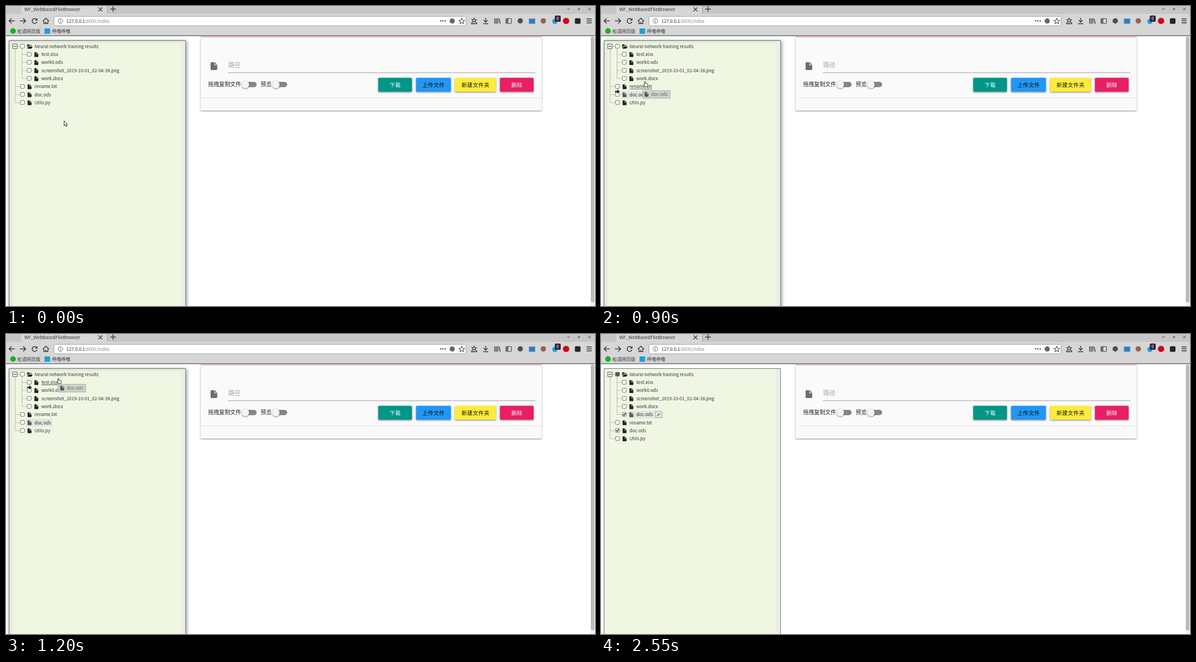
These frames come from a looping animation (1048x534 px, 2.9 s). An HTML page with a canvas:

```html
<!DOCTYPE html>
<html lang="zh">
<head>
<meta charset="utf-8">
<style>
  html, body { margin: 0; width: 100%; height: 100%; overflow: hidden; background: #fff; }
  canvas { display: block; }
</style>
</head>
<body>
<canvas id="stage" width="1048" height="534"></canvas>
<script>
const ctx = document.getElementById('stage').getContext('2d');
const LOOP = 2900, STEP = 50, ROW = 14.3, TOP = 71.8;
const INK = '#3b3b3b';

function box(x, y, w, h, fill, stroke, r = 0) {
  ctx.beginPath();
  ctx.roundRect(x, y, w, h, r);
  if (fill) { ctx.fillStyle = fill; ctx.fill(); }
  if (stroke) { ctx.strokeStyle = stroke; ctx.lineWidth = 1; ctx.stroke(); }
}

function dot(x, y, r, fill) {
  ctx.beginPath();
  ctx.arc(x, y, r, 0, 7);
  ctx.fillStyle = fill;
  ctx.fill();
}

function shape(x, y, d, fill, stroke, width = 1) {
  const path = new Path2D(d);
  ctx.save();
  ctx.translate(x, y);
  if (fill) { ctx.fillStyle = fill; ctx.fill(path); }
  if (stroke) { ctx.strokeStyle = stroke; ctx.lineWidth = width; ctx.stroke(path); }
  ctx.restore();
}

const line = (d, color = INK, width = 1.4) => shape(0, 0, d, null, color, width);

function text(s, x, y, size = 7.95, color = '#333', spacing = 0) {
  ctx.font = `${size}px "Noto Sans CJK SC", "Noto Sans CJK", "Noto Sans", sans-serif`;
  ctx.letterSpacing = spacing + 'px';
  ctx.fillStyle = color;
  ctx.fillText(s, x, y);
  return ctx.measureText(s).width;
}

function shadowed(blur, dx, dy, alpha, draw) {
  ctx.save();
  ctx.shadowColor = `rgba(0,0,0,${alpha})`;
  ctx.shadowBlur = blur;
  ctx.shadowOffsetX = dx;
  ctx.shadowOffsetY = dy;
  draw();
  ctx.restore();
}

// ---- browser chrome ----
function browser() {
  box(0, 0, 1048, 14, '#c6c6c6');
  box(0, 14, 1048, 39, '#d6d6d6');
  box(27, 0, 153, 14, '#d6d6d6');
  line('M180.5 0V13.5', '#999', 1);
  text('WF_WebBasedFileBrowser', 32.8, 9, 8, '#333');
  line('M164.5 2.5l7 7m0-7l-7 7', INK, 1.2);
  line('M185.5 5.5h10M190.5 .5v10', INK, 1.4);
  line('M998.5 5.5h5M1017 5.5h5M1019.5 3v5M1035.5 3l5 5m0-5l-5 5', '#555', 1);

  line('M15.5 26.5H5.5M10 22L5.5 26.5L10 31M25 26.5H35M30.5 22L35 26.5L30.5 31', INK, 1.5);
  line('M54 23.6A4.3 4.3 0 1 0 55 28', INK, 1.5);
  shape(51.5, 21.5, 'M4.5 0V4.5H0Z', INK);
  line('M65.5 27L71 21.8L76.5 27M67.5 26.5V31.2H74.5V26.5M71 31V28', INK, 1.4);

  box(85.5, 18.5, 733, 16.5, '#fff', '#a6a6a6', 2);
  line('M101 26.7A4.2 4.2 0 1 1 92.6 26.7A4.2 4.2 0 1 1 101 26.7M96.8 26v3.2M96.8 24v1', '#666', 1);
  const w = text('127.0.0.1', 107.6, 29.7, 7.95, '#222');
  text(':8000/index', 107.6 + w, 29.7, 7.95, '#888');
  for (const x of [773.5, 777.5, 781.5]) dot(x, 26.5, 1.3, '#555');
  dot(794, 26.7, 4.6, '#666');
  const star = 'M0-5L1.5-1.6L5.1-1.3L2.4 1.1L3.2 4.6L0 2.7L-3.2 4.6L-2.4 1.1L-5.1-1.3L-1.5-1.6Z';
  shape(811, 26.8, star, null, '#555', 1.1);

  shape(833, 25.5, 'M0-4L1.2-1.3L4-1L2 1L2.6 3.5L0 2.2L-2.6 3.5L-2 1L-4-1L-1.2-1.3Z', null, INK, 1.2);
  line('M828.5 29v2.5h9V29M853.5 21v7.5M850 25.2l3.5 3.5l3.5-3.5M849 31.5h9', INK, 1.4);
  line('M869.5 22v9.5M872.3 22v9.5M875 22v9.5M877 22.2l2.5 9.3', INK, 1.4);
  box(889.5, 22.5, 10, 8.5, null, INK, 1);
  box(890, 23, 4, 8, '#777');
  dot(915, 26.5, 4.7, '#45544a');
  box(930.5, 22.5, 11, 9, '#2c7fc0');
  dot(956, 26.5, 4.8, '#93615a');
  dot(976.5, 27.5, 4.6, '#16a3df');
  box(976.5, 17, 10.5, 11, '#34203c', null, 1.5);
  text('0', 979.6, 25.3, 7.6, '#fff');
  dot(996.5, 26.5, 5.6, '#c90a15');
  box(1012.2, 21.7, 10, 10, '#262626', null, 2);
  line('M1033 23h9M1033 26.5h9M1033 30h9', INK, 1.4);

  dot(12.5, 44.5, 5, '#17b51e');
  text('松语网页版', 20.3, 48, 8.2);
  box(68.5, 40, 10, 9.5, '#1a9fd9');
  text('呼噜呼噜', 81.8, 48, 8.2);
  box(0, 52.3, 1048, 1.2, '#555');
}

// ---- right hand card ----
function toggle(x) {
  box(x, 135, 23, 9.4, '#858585', null, 4.7);
  shadowed(3, 0, 1, .45, () => dot(x + 3, 139.8, 6.6, '#f4f4f4'));
}

function button(label, x, w, fill, color) {
  shadowed(3, 0, 1.5, .4, () => box(x, 127.8, w, 24.7, fill, null, 1.5));
  ctx.textAlign = 'center';
  text(label, x + w / 2 + .2, 143.8, 9.6, color, .4);
  ctx.textAlign = 'left';
}

function card() {
  box(1040, 54, 8, 480, '#f1f1f1');
  box(1041.5, 55.5, 4.5, 471.5, '#bdbdbd', '#a5a5a5', 2);
  shadowed(3, 0, 1.3, .4, () => box(346.3, 55, 606.7, 131, '#fafafa', null, 1));
  box(346.3, 54, 606.7, 2, '#f3b6c2');
  box(346.3, 163, 606.7, 1, '#e6e6e6');
  shape(364, 100, 'M1.4 0H7.5L11.8 4.4V12.6Q11.8 14 10.4 14H1.4Q0 14 0 12.6V1.4Q0 0 1.4 0Z', '#6e6e6e');
  line('M371 101V105H375.2', '#fafafa', 1);
  text('路径', 395.3, 108.5, 11, '#a6a6a6');
  box(395, 118.2, 547, 1, '#9e9e9e');
  text('拖拽复制文件', 359.7, 142.6, 9.75, '#222');
  toggle(423);
  text('预览', 453, 142.6, 9.75, '#222');
  toggle(477.3);
  button('下载', 662.3, 60, '#009688', '#fff');
  button('上传文件', 729.6, 62, '#2196f3', '#111');
  button('新建文件夹', 798.8, 73, '#ffeb3b', '#111');
  button('删除', 878.8, 60, '#e91e63', '#fff');
}

// ---- file tree ----
const folder = { name: 'Neural network training results', level: 0, folder: true };
const children = ['test.xlsx', 'work0.ods', 'screenshot_2019-10-01_02-04-38.png', 'work.docx']
  .map(name => ({ name, level: 1 }));
const roots = ['rename.txt', 'doc.ods', 'Utils.py'].map(name => ({ name, level: 0 }));
const copy = { name: 'doc.ods', level: 1, checked: true };
const before = [folder, ...children, ...roots];
const after = [folder, ...children, copy, ...roots];
const DOC = 6;

function fileIcon(x, y, color = '#222') {
  shape(x, y, 'M.8 0H4L7 3V7.8Q7 8.6 6.2 8.6H.8Q0 8.6 0 7.8V.8Q0 0 .8 0Z', color);
  line(`M${x + 3.9} ${y + .3}V${y + 3.2}H${x + 6.8}`, '#eff6e2', .7);
}

function folderIcon(x, y, color) {
  shape(x, y, 'M0 6.5V1Q0 0 1 0H3.2L4.4 1.2H7.3Q8.2 1.2 8.2 2.6H3.3Q2.4 2.6 2 3.2ZM.4 7.8L2.7 3.7H10L7.8 7.2Q7.4 7.8 6.8 7.8Z', color);
}

function checkbox(x, y, state) {
  box(x, y, 7.4, 7, state === 'part' ? '#555' : '#f7f8f4', '#777', 1.5);
  if (state === true) shape(x, y, 'M1.4 3.4L3.2 5.3L6.4 1.2', null, '#222', 1.4);
}

function pencil(x, y) {
  box(x + .5, y - 5.5, 11, 11, '#e9ebe4', '#a5a8a0');
  shape(x, y, 'M3 3.2L3.5 1.2L7.2-2.8L9-1.1L5.2 2.7Z', '#888');
}

function tree(rows, s) {
  const draw = () => box(5.5, 61.5, 314, 490, '#eff6e2', '#617775');
  if (s.done) draw(); else shadowed(6, 1.5, 1, .4, draw);
  box(311.5, 62, 7.6, 472, '#ebeee6');
  const inner = s.drag && s.hover === 0;
  const rowY = i => TOP + ROW * i + (inner && i ? 1.1 : 0);
  const lastChild = rows.length - 4;
  const grey = '#b4b9ae';
  line(`M16.2 76V${rowY(rows.length - 1)}M28.4 76V${rowY(lastChild)}M20 ${TOP}H24`, grey, 1);
  box(12, 67.8, 8, 8, '#f7f8f4', '#555');
  line('M13.7 71.8H18.4', '#333', 1.1);

  rows.forEach((row, i) => {
    const y = rowY(i), dx = row.level * 12.1, x = 51 + dx;
    const hovered = s.hover === i, target = inner && i === 0;
    const selected = s.done ? row === copy : s.selected && i === DOC;
    if (i) line(`M${16.5 + dx} ${y}H${24 + dx}`, grey, 1);
    checkbox(25.6 + dx, y - 3.7, s.done && (row.folder ? 'part' : row.name === 'doc.ods'));
    ctx.font = '7.95px "Noto Sans CJK SC", "Noto Sans CJK", "Noto Sans", sans-serif';
    ctx.letterSpacing = '0px';
    const w = ctx.measureText(row.name).width;
    if (target) box(35.5, 65.4, w + 18, 13.6, '#b5b8b0', '#979992');
    if (selected) box(x - 15, y - 6.6, w + (s.done ? 33 : 17), 13.4, '#e3e5e0');
    if (row.folder) folderIcon(37.6, y - 3.6, target ? '#666' : '#222');
    else fileIcon(x - 12.6, y - 3.9, selected ? '#555' : '#222');
    const color = target ? '#fff' : '#333';
    text(row.name, x - .2, y + 2.9, 7.95, color);
    if (hovered) box(x, y + 4.1, w, .8, color);
    if ((hovered && !s.drag && !s.selected) || row === copy) pencil(x + w + 4, y);
  });

  if (s.drag && s.hover !== DOC && s.hover >= 0) {
    const x = inner ? 28 : 25 + rows[s.hover].level * 12.5;
    const y = inner ? 72.2 : rowY(s.hover) + 9;
    shape(x, y, 'M0-1.2H4V-4L8.4 0L4 4V1.2H0Z', '#222');
  }
  if (s.drag) {
    const [x, y] = [s.ghost[0] + 1.5, s.ghost[1] + 5];
    box(x + .5, y + .5, 49, 13.8, inner ? 'rgba(203,221,210,.9)' : 'rgba(204,207,201,.9)', '#b0b6ad');
    fileIcon(x + 4, y + 3, '#555');
    text('doc.ods', x + 15.8, y + 10.2, 7.95, '#666');
  }
}

// ---- pointer ----
const track = [
  [200, 103, 204], [500, 65, 160], [700, 65, 160], [850, 72, 145], [900, 77, 134],
  [1000, 87, 102], [1050, 89, 95], [1250, 93, 73], [1350, 93.5, 69]
];

function pointerAt(t) {
  const n = track.findIndex(k => k[0] > t);
  if (n < 0) return track.at(-1).slice(1);
  if (n === 0) return track[0].slice(1);
  const [a, b] = [track[n - 1], track[n]], f = (t - a[0]) / (b[0] - a[0]);
  return [a[1] + (b[1] - a[1]) * f, a[2] + (b[2] - a[2]) * f];
}

function arrow(x, y) {
  shape(x, y, 'M.4.4V9.2L2.4 7.4L3.8 10.6L5.2 10L3.8 6.9H6.5Z', '#fff', '#222', .9);
}

function hand(x, y) {
  shape(x - 1.5, y, 'M2 5.8V1.2Q2 .3 2.8 .3T3.6 1.2V3.8L7 4.5Q8 4.8 7.9 5.8L7.3 9.6H3L.4 6.4Q0 5.4 1 5.3Z', '#fff', '#222', .9);
}

function render(now) {
  const t = Math.floor(now % LOOP / STEP) * STEP;
  const done = t >= 2250, drag = !done && t >= 800;
  const pointer = pointerAt(t), ghost = pointerAt(t - STEP);
  const [x, y] = drag ? ghost : pointer;
  const row = Math.floor((y - TOP + ROW / 2) / ROW);
  const hover = !done && x < 100 && row < before.length ? row : -1;

  ctx.fillStyle = '#fff';
  ctx.fillRect(0, 0, 1048, 534);
  browser();
  card();
  tree(done ? after : before, { done, drag, hover, ghost, selected: t >= 750 });
  if (done) { if (t < 2550) arrow(49.5, 4); }
  else if (hover >= 0) hand(...pointer);
  else arrow(...pointer);
}

function loop() {
  render(performance.now());
  requestAnimationFrame(loop);
}
loop();
</script>
</body>
</html>
```
